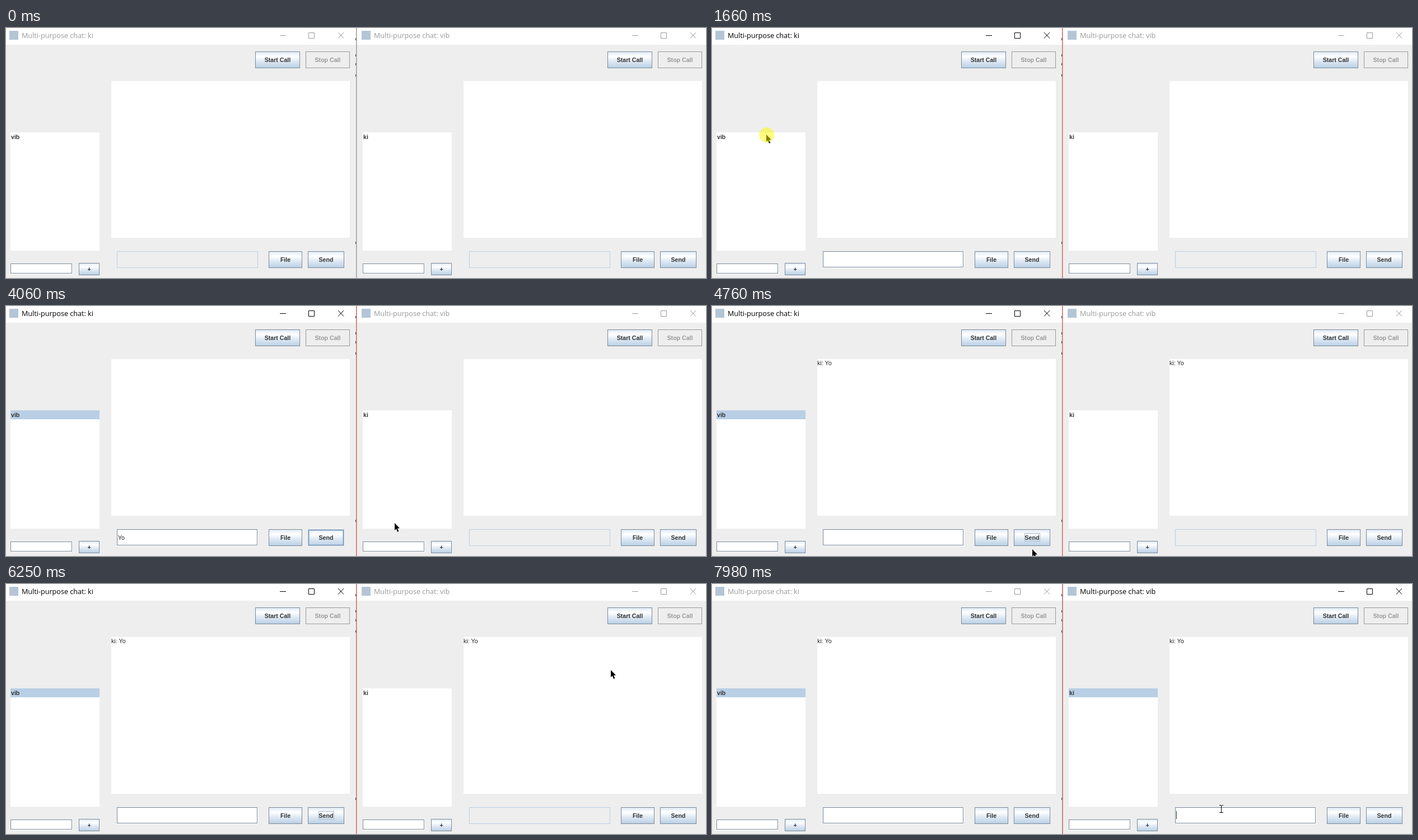
Write an HTML page with a canvas that moves like this. It is 1250 px wide and 448 px high and loops after 8000 ms.

```html
<!DOCTYPE html>
<html lang="en">
<head>
<meta charset="utf-8">
<title>Multi-purpose chat</title>
<style>
html, body { margin: 0; width: 100%; height: 100%; overflow: hidden; background: #eee; }
canvas { display: block; }
</style>
</head>
<body>
<canvas id="stage" width="1250" height="448"></canvas>
<script>
const ctx = document.getElementById('stage').getContext('2d');
const LOOP = 8000, TICK = 78, BLINK = 465, CLICK = 150;
const RIGHT = 629;
const LEFT_USER = 'ki', RIGHT_USER = 'vib';
const STEEL = '#7a8a99', PALE = '#b8cfe5', INK = '#333';
const BOLD = 'bold 10.6px "Liberation Sans", Arial, sans-serif';
const PLAIN = '10.6px "Liberation Sans", Arial, sans-serif';
const TITLE = '12.6px "Open Sans", "Noto Sans", sans-serif';

const box = (x, y, w, h) => ({ x, y, w, h });
const spot = (x, y) => ({ x, y });
const layout = {
  start: box(445, 42, 80, 30),
  stop: box(535, 42, 79, 30),
  list: box(8, 187, 159, 212),
  chat: box(188, 95, 426, 281),
  name: box(8, 422, 110, 18),
  add: box(130, 421, 37, 22),
  field: box(198, 400, 251, 29),
  file: box(469, 400, 60, 30),
  send: box(539, 400, 65, 30)
};

// Event times in ms.
const at = {
  leftActive: 1570, leftSelect: 1720, leftFocus: 2350, typeY: 3030, typeO: 3260,
  sendHover: 3970, send: 4520, rightActive: 7190, rightSelect: 7830
};
const clicks = [at.leftActive, at.leftFocus, at.send, at.rightActive, at.rightSelect];

const entry = spot(73, 297);
const sendSpot = spot(576.5, 416.5);
const glides = [];
function glide(from, to, target) {
  const start = glides.length ? glides[glides.length - 1].target : entry;
  glides.push({ from, to, start, target });
}
glide(410, 620, spot(92, 143));
glide(710, 1100, spot(485, 54));
glide(1100, 1490, spot(97, 191));
glide(at.leftSelect, at.leftFocus, spot(238, 420));
glide(2420, 2500, spot(236, 420));
glide(at.typeY, 3120, spot(231, 460));
glide(at.sendHover, 4050, spot(694, 389));
glide(4130, 4370, sendSpot);
glide(4680, 4830, spot(572, 436));
glide(4830, 4990, sendSpot);
glide(5630, 6080, spot(1000, 88));
glide(6080, 6330, spot(1081, 155));
glide(6420, 6650, spot(900, 258));
glide(6650, 6890, spot(712, 202));
glide(7350, 7600, spot(909, 403));

const during = (t, from, to) => t >= from && t < to;

function pointerAt(t) {
  const g = glides.filter(g => g.from <= t).pop();
  if (!g) return null;
  const elapsed = (Math.floor((t - g.from) / TICK) + 1) * TICK;
  const u = Math.min(1, elapsed / (g.to - g.from));
  const eased = u * u * (3 - 2 * u);
  return spot(
    g.start.x + (g.target.x - g.start.x) * eased,
    g.start.y + (g.target.y - g.start.y) * eased
  );
}

function inside(p, { x, y, w, h }) {
  return !!p && p.x >= x && p.x < x + w && p.y >= y && p.y < y + h;
}

function fill(color, { x, y, w, h }) {
  ctx.fillStyle = color;
  ctx.fillRect(x, y, w, h);
}

function frame(color, { x, y, w, h }, inset = 0) {
  ctx.strokeStyle = color;
  ctx.lineWidth = 1;
  const d = inset + .5;
  ctx.strokeRect(x + d, y + d, w - 2 * d, h - 2 * d);
}

function text(s, x, y, font, color = INK, align = 'left') {
  ctx.font = font;
  ctx.fillStyle = color;
  ctx.textAlign = align;
  ctx.fillText(s, x, y);
}

function button(label, r, { disabled, hover, pressed, focus } = {}) {
  if (!disabled) {
    const shade = ctx.createLinearGradient(0, r.y, 0, r.y + r.h);
    shade.addColorStop(0, '#dde8f3');
    shade.addColorStop(.3, '#fff');
    shade.addColorStop(.6, '#dde8f3');
    shade.addColorStop(1, PALE);
    fill(pressed ? PALE : shade, r);
  }
  if (hover && !pressed) {
    frame(PALE, r);
    frame('#6f8aad', r, 1);
    frame(PALE, r, 2);
  } else {
    frame(disabled ? '#999' : STEEL, r);
  }
  const cx = r.x + r.w / 2, cy = r.y + r.h / 2;
  if (focus) frame('#a3b8cc', box(Math.floor(cx) - 13, cy - 8, 28, 15));
  text(label, cx, cy + 3.8, BOLD, disabled ? '#999' : INK, 'center');
}

function field(r, enabled = true) {
  if (!enabled) return frame(PALE, box(r.x, r.y, r.w + 1, r.h + 1));
  fill('#fff', box(r.x, r.y, r.w + 1, r.h + 1));
  frame(STEEL, r);
}

function controls(color) {
  ctx.strokeStyle = color;
  ctx.lineWidth = 1;
  ctx.beginPath();
  ctx.moveTo(489, 13.5);
  ctx.lineTo(500, 13.5);
  ctx.rect(540.5, 8.5, 10, 10);
  ctx.moveTo(593, 8);
  ctx.lineTo(603, 18.5);
  ctx.moveTo(603, 8);
  ctx.lineTo(593, 18.5);
  ctx.stroke();
}

function chatWindow(left, s) {
  const p = s.pointer && spot(s.pointer.x - left, s.pointer.y);
  const { list, chat, field: input } = layout;
  ctx.save();
  ctx.translate(left, 0);
  fill('#eee', box(0, 30, 625, 418));
  fill('#fff', box(0, 0, 625, 30));
  fill('#b4c5d6', box(6, 5, 16, 16));
  text('Multi-purpose chat: ' + s.user, 28, 18, TITLE, s.active ? '#000' : '#999');
  controls(s.active ? '#000' : '#999');

  button('Start Call', layout.start, { hover: inside(p, layout.start) });
  button('Stop Call', layout.stop, { disabled: true });

  fill('#fff', chat);
  if (s.received) text(LEFT_USER + ': Yo', chat.x, chat.y + 11, PLAIN, '#222');

  fill('#fff', list);
  if (s.selected) fill(PALE, box(list.x, list.y, list.w, 16));
  text(s.peer, list.x + 1, list.y + 12, BOLD);

  field(layout.name);
  button('+', layout.add);

  field(input, s.enabled);
  const textX = input.x + 2;
  text(s.draft, textX, input.y + 18.5, PLAIN, '#222');
  if (s.caret) fill(INK, box(textX + Math.floor(ctx.measureText(s.draft).width), 407, 1, 14));

  button('File', layout.file, { hover: inside(p, layout.file) });
  button('Send', layout.send, { ...s.send, hover: s.send.hover || inside(p, layout.send) });
  ctx.restore();
}

function divider(leftActive, rightActive) {
  fill('#eee', box(625, 30, 4, 418));
  fill('#fff', box(625, 0, 4, 30));
  // Slivers of the text behind both windows.
  for (const y of [20, 49, 65, 85, 385]) fill('#444', box(624, y - 2, 3, 4));
  const [edge, glow] = leftActive ? ['#d9605c', '#e8b0ae']
    : rightActive ? ['#b98a86', '#d9807c'] : ['#a0a0a0', '#c4c4c4'];
  fill(edge, box(625, 0, 1, 448));
  fill(glow, box(626, 0, 1, 448));
}

function drawArrow(x, y) {
  ctx.fillStyle = '#000';
  ctx.beginPath();
  ctx.moveTo(x, y);
  ctx.lineTo(x, y + 12.8);
  ctx.lineTo(x + 2.9, y + 10.2);
  ctx.lineTo(x + 5, y + 15.8);
  ctx.lineTo(x + 7.3, y + 14.8);
  ctx.lineTo(x + 5, y + 9.5);
  ctx.lineTo(x + 9, y + 9.2);
  ctx.fill();
}

function drawBeam(x, y) {
  fill('#000', box(x, y - 6, 1, 13));
  for (const end of [y - 7, y + 6]) {
    fill('#000', box(x - 3, end, 3, 1));
    fill('#000', box(x + 1, end, 3, 1));
  }
}

function drawPointer(p, overField, clicking) {
  if (overField) drawBeam(Math.round(p.x), Math.round(p.y));
  else drawArrow(p.x, p.y);
  if (!clicking) return;
  ctx.fillStyle = 'rgba(252, 250, 0, .5)';
  ctx.beginPath();
  ctx.arc(p.x + .5, p.y + .5, 13.4, 0, Math.PI * 2);
  ctx.fill();
}

function caretOn(t) {
  if (during(t, at.leftFocus, at.send)) {
    const reset = [at.leftFocus, at.typeY, at.typeO].filter(k => k <= t).pop();
    return Math.floor((t - reset) / BLINK) % 2 === 0;
  }
  return false;
}

function draw(t) {
  const pointer = pointerAt(t);
  const sent = at.send + CLICK;
  const rightActive = t >= at.rightActive + TICK;
  const leftActive = t >= at.leftActive && !rightActive;
  const received = t >= sent;
  const typed = (t >= at.typeY) + (t >= at.typeO);

  chatWindow(0, {
    user: LEFT_USER, peer: RIGHT_USER, pointer, received,
    active: leftActive, enabled: t >= at.leftActive, selected: t >= at.leftSelect,
    draft: received ? '' : 'Yo'.slice(0, typed),
    caret: caretOn(t),
    send: {
      hover: during(t, at.sendHover, at.send),
      pressed: during(t, at.send, sent),
      focus: t >= at.send && leftActive
    }
  });
  chatWindow(RIGHT, {
    user: RIGHT_USER, peer: LEFT_USER, pointer, received,
    active: rightActive, enabled: rightActive, selected: t >= at.rightSelect,
    draft: '', caret: t >= at.rightSelect, send: {}
  });
  divider(leftActive, rightActive);

  if (!pointer) return;
  const { field: input } = layout;
  const overField = t >= at.leftActive && inside(pointer, input)
    || rightActive && inside(pointer, { ...input, x: input.x + RIGHT });
  drawPointer(pointer, overField, clicks.some(c => during(t, c, c + CLICK)));
}

function tick() {
  draw(performance.now() % LOOP);
  requestAnimationFrame(tick);
}
tick();
</script>
</body>
</html>
```
